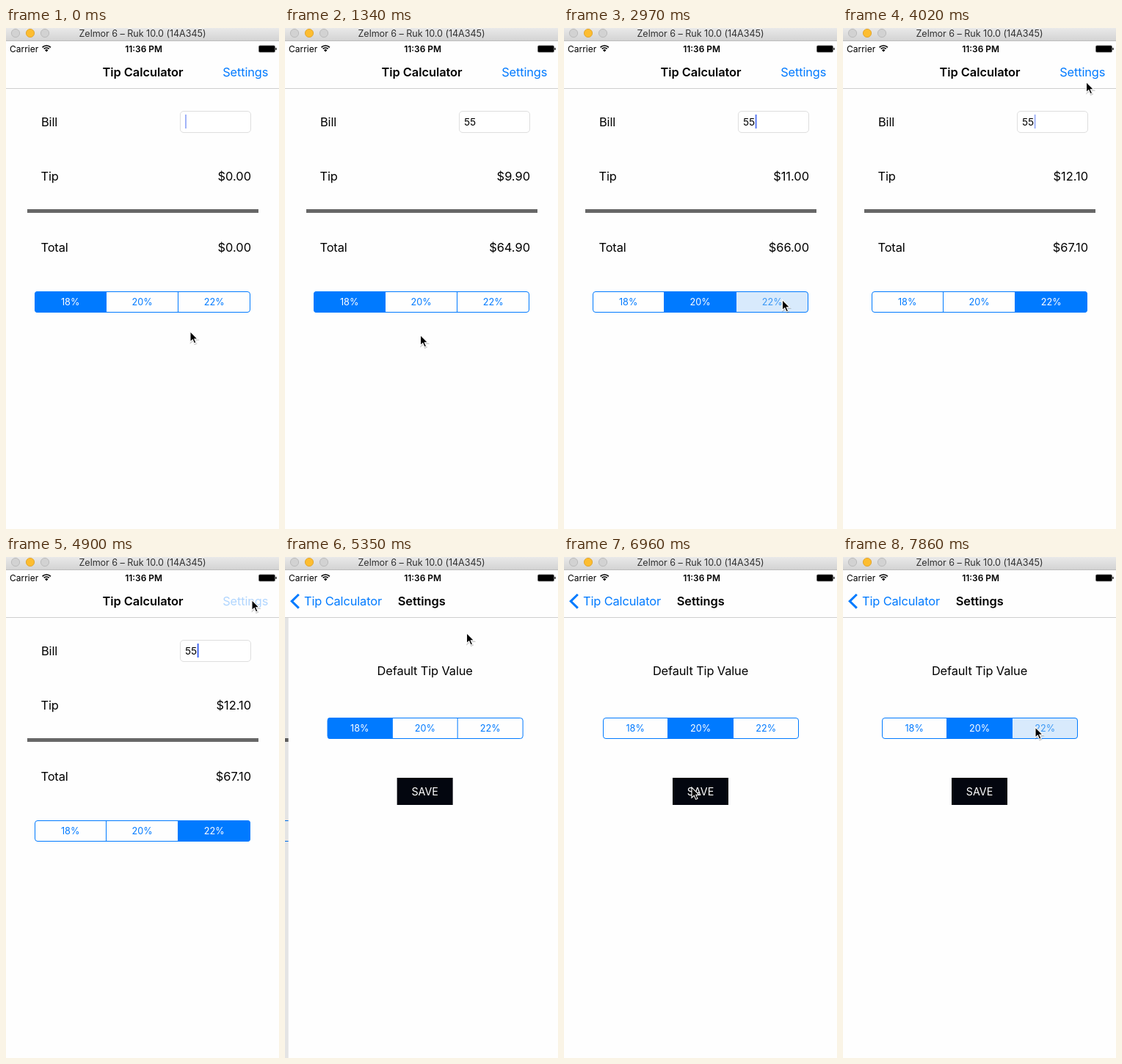
These frames come from a looping animation (372 by 683 pixels, 8000 ms). An HTML page:

```html
<!DOCTYPE html>
<html lang="en">
<head>
<meta charset="utf-8">
<title>Tip Calculator</title>
<style>
  html, body { margin: 0; width: 100%; height: 100%; overflow: hidden; background: #fefefe; }
  svg { display: block; width: 372px; height: 683px; }
  text { font-family: Inter, "Open Sans", sans-serif; white-space: pre; }
</style>
</head>
<body>
<svg id="stage" viewBox="0 0 372 683" xmlns="http://www.w3.org/2000/svg">
  <defs>
    <linearGradient id="chrome" x1="0" y1="0" x2="0" y2="1">
      <stop offset="0" stop-color="#e9e9e9"/><stop offset="1" stop-color="#d2d2d2"/>
    </linearGradient>
    <path id="arrow" d="M0 0V14.2L3.3 11.2 5.6 16.4 8 15.4 5.8 10.4H10.2Z"/>
  </defs>
  <rect width="372" height="683" fill="#fefefe"/>
  <g id="page"></g>
  <g id="bars"></g>
  <g id="nav"></g>
  <g id="pointer">
    <use href="#arrow" x=".5" y="1.2" opacity=".18" stroke="#000" stroke-width="1.6"/>
    <use href="#arrow" stroke="#fff" stroke-width="1.1"/>
  </g>
</svg>
<script>
const LOOP = 8000, STEPS = 54, WIDTH = 372;
const BLUE = '#007aff', BLACK = '#000';
const RATES = [18, 20, 22];
const $ = id => document.getElementById(id);

// Moments, counted in steps
const TYPED = 6, TAP_SETTINGS = 33, PUSH = 36;
const MAIN_TAPS = [14, 21], PREF_TAPS = [45, STEPS];

// Pointer journeys; dip bends the way downwards
const HOME = { x: 251, y: 413.7 };
const MOVES = [
  { from: 5, to: 9, x: 184.5, y: 418.5, dip: 112 },
  { from: 9, to: 12, x: 180, y: 372 },
  { from: 18, to: 20, x: 297.5, y: 370.5 },
  { from: 21, to: 27, x: 331.5, y: 73.5 },
  { from: 27, to: 30, x: 335, y: 58.5 },
  { from: 35, to: 36, x: 247.5, y: 103.5 },
  { from: 36, to: 41, x: 190.5, y: 235 },
  { from: 45, to: 47, x: 174, y: 314 },
  { from: 49, to: 53, x: 262, y: 232 }
];

const clamp = v => Math.min(1, Math.max(0, v));
const easeOut = u => u * (2 - u);

function pointerAt(k) {
  let { x, y } = HOME;
  for (const m of MOVES) {
    const u = easeOut(clamp((k - m.from) / (m.to - m.from)));
    x += (m.x - x) * u;
    y += (m.y - y) * u + (m.dip || 0) * 4 * u * (1 - u);
  }
  return [x, y];
}

// Solid while typing, then one soft blink per second
function caretAlpha(k) {
  if (k > 0 && k <= TYPED) return 1;
  return clamp(.5 - 1.6 * Math.sin(2 * Math.PI * k * LOOP / STEPS / 1000));
}

// Each tap picks the next rate; the cell is lit one step earlier
function picked(taps, k) {
  const chosen = taps.filter(t => t <= k).length;
  return { chosen, pressed: taps.includes(k + 1) ? chosen + 1 : -1 };
}

const rect = (x, y, w, h, fill, more = '') =>
  `<rect x="${x}" y="${y}" width="${w}" height="${h}" fill="${fill}" ${more}/>`;

const shift = (x, body) => `<g transform="translate(${x} 0)">${body}</g>`;

function label(str, x, y, { size = 16.4, fill = BLACK, anchor = 'start', weight = 400, gap = -0.13, alpha = 1 } = {}) {
  return `<text x="${x}" y="${y}" font-size="${size}" fill="${fill}" text-anchor="${anchor}" ` +
    `font-weight="${weight}" letter-spacing="${gap}" opacity="${alpha}">${str}</text>`;
}

function segments(id, x, y, cell, { chosen, pressed }) {
  const w = cell * 3;
  let fills = '', marks = '';
  RATES.forEach((rate, i) => {
    const edge = i ? 1 : 0, left = x + cell * i - edge;
    const fill = i === chosen ? BLUE : i === pressed ? '#d8eafc' : 'none';
    const ink = i === chosen ? '#fff' : i === pressed ? '#3b98f5' : BLUE;
    fills += rect(left, y, cell + edge, 29, fill);
    if (i) marks += rect(left, y, 1, 29, BLUE);
    marks += label(rate + '%', x + cell * (i + .5) - .3, y + 19, { size: 12.7, fill: ink, anchor: 'middle', gap: 0 });
  });
  return `<clipPath id="${id}">${rect(x, y, w, 29, BLACK, 'rx="4"')}</clipPath>` +
    `<g clip-path="url(#${id})">${fills}</g>${marks}` +
    rect(x + .5, y + .5, w - 1, 28, 'none', `rx="3.5" stroke="${BLUE}"`);
}

function calculator(k) {
  const bill = '55'.slice(0, k);
  const pick = picked(MAIN_TAPS, k);
  const tip = bill * RATES[pick.chosen] / 100;
  const money = (v, y) => label('$' + v.toFixed(2), 334, y, { anchor: 'end', gap: 0 });
  return label('Bill', 48, 134) + label('Tip', 47.5, 208) + label('Total', 47.5, 305) +
    rect(237.5, 113.5, 96, 29, '#fff', 'rx="4.5" stroke="#dedede"') +
    label(bill, 244, 133, { size: 13.7, gap: 0 }) +
    rect(244 + bill.length * 8.3, 118, 2, 19, '#4468f2', `opacity="${caretAlpha(k)}"`) +
    money(tip, 208) + money(+bill + tip, 305) +
    rect(29, 247, 315, 5, '#676767') +
    segments('main', 39, 359, 98, pick);
}

function settings(k) {
  return rect(0, 83, WIDTH, 600, '#fefefe') +
    label('Default Tip Value', 186, 161, { anchor: 'middle' }) +
    segments('prefs', 53, 219, 89, picked(PREF_TAPS, k)) +
    rect(148, 301, 76, 37, '#03060f') +
    label('SAVE', 186, 325, { size: 14.3, fill: '#fff', anchor: 'middle', gap: 0 });
}

function page(k) {
  if (k < PUSH) return calculator(k);
  const rest = k === PUSH ? .0125 : 0; // share of the push still to go
  return shift(-.3 * WIDTH * (1 - rest), calculator(k)) +
    rect(0, 83, WIDTH, 600, BLACK, 'opacity=".1"') +
    shift(WIDTH * rest, settings(k));
}

function nav(k) {
  const bold = { weight: 600, anchor: 'middle', gap: -0.05 };
  if (k < PUSH) {
    return label('Tip Calculator', 186.5, 66, bold) +
      label('Settings', 357.3, 66, { fill: BLUE, anchor: 'end', alpha: k < TAP_SETTINGS ? 1 : .3 });
  }
  return `<path d="M18.8 51L9.2 60.3 18.8 69.6" fill="none" stroke="${BLUE}" stroke-width="3"/>` +
    label('Tip Calculator', 26, 66, { fill: BLUE }) + label('Settings', 186.2, 66, bold);
}

function bars() {
  const light = (x, fill, line) => `<circle cx="${x}" cy="7" r="5.6" fill="${fill}" stroke="${line}" stroke-width=".9"/>`;
  const wave = r => {
    const d = r * Math.SQRT1_2;
    return `<path d="M${55.2 - d} ${32 - d}A${r} ${r} 0 0 1 ${55.2 + d} ${32 - d}" fill="none" stroke="#000" stroke-width="1.7"/>`;
  };
  return rect(0, 18, WIDTH, 64, '#fefefe') + rect(0, 82, WIDTH, 1, '#cfcfcf') +
    rect(0, 0, WIDTH, 18, 'url(#chrome)') + rect(0, 17, WIDTH, 1, '#bdbdbd') +
    light(13, '#d2d2d2', '#b8b8b8') + light(33, '#fdbd30', '#dfa32b') + light(53, '#d2d2d2', '#b8b8b8') +
    label('Zelmor 6 – Ruk 10.0 (14A345)', 186, 12, { size: 12.6, fill: '#303030', anchor: 'middle', gap: -0.05 }) +
    label('Carrier', 5, 32.5, { size: 12, gap: 0 }) +
    wave(8) + wave(5) + '<path d="M55.2 32.6L53 30.3A3 3 0 0 1 57.4 30.3Z"/>' +
    label('11:36 PM', 187.6, 32.5, { size: 11.9, weight: 600, anchor: 'middle', gap: 0 }) +
    rect(344.5, 24, 22, 9, BLACK, 'rx="1.5" stroke="#666" stroke-width=".7"') +
    rect(367.3, 27, 1.3, 3, BLACK);
}

let shown = -1;
function draw(time) {
  // the small lead absorbs uneven step lengths
  const k = Math.min(STEPS - 1, Math.floor(time % LOOP / LOOP * STEPS + .045));
  if (k === shown) return;
  shown = k;
  $('page').innerHTML = page(k);
  $('nav').innerHTML = nav(k);
  $('pointer').setAttribute('transform', `translate(${pointerAt(k)})`);
}

$('bars').innerHTML = bars();
const origin = performance.now();
function tick() {
  draw(performance.now() - origin);
  requestAnimationFrame(tick);
}
tick();
</script>
</body>
</html>
```
